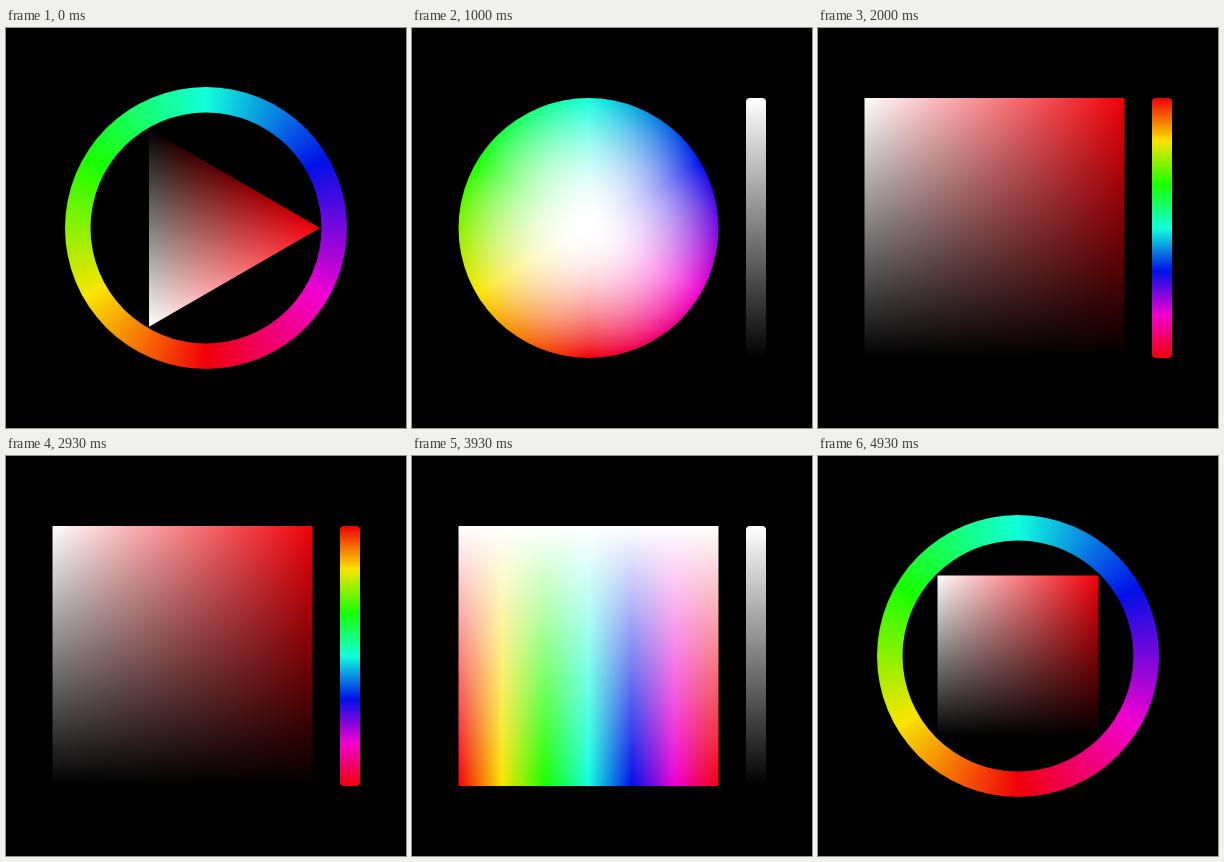
Animation, 400 px wide and 400 px high, one loop 4.99 s. Source, as an HTML page with a canvas:

```html
<!DOCTYPE html>
<html lang="en">
<head>
<meta charset="utf-8">
<title>Colour pickers</title>
<style>
  html, body { margin: 0; width: 100%; height: 100%; overflow: hidden; background: #000; }
  canvas { display: block; width: 100vw; height: 100vh; }
</style>
</head>
<body>
<canvas id="stage" width="400" height="400"></canvas>
<script>
const SIZE = 400, LOOP = 4990, SLIDE = 1000, TAU = Math.PI * 2;
const stage = document.getElementById('stage').getContext('2d');
const clamp = v => Math.min(1, Math.max(0, v));
const mix = (a, b, t) => a.map((v, i) => v + (b[i] - v) * t);

const BLACK = [0, 0, 0], WHITE = [255, 255, 255];
const RED = [240, 0, 8], YELLOW = [250, 228, 0], GREEN = [25, 255, 0];
const CYAN = [18, 255, 220], BLUE = [0, 15, 232], MAGENTA = [240, 0, 208];
const HUES = [RED, YELLOW, GREEN, CYAN, BLUE, MAGENTA];

function hsv(h, s, v) {
  const sector = Math.floor(h * 6);
  const hue = mix(HUES[sector % 6], HUES[(sector + 1) % 6], h * 6 - sector);
  return mix(BLACK, mix(WHITE, hue, s), v);
}

function newLayer() {
  const layer = document.createElement('canvas');
  layer.width = layer.height = SIZE;
  return layer.getContext('2d');
}

// Fills a path with a colour computed for each pixel.
function paint(target, path, colorAt) {
  const texture = newLayer(), image = texture.createImageData(SIZE, SIZE);
  for (let y = 0, i = 0; y < SIZE; y++) {
    for (let x = 0; x < SIZE; x++, i += 4) {
      image.data.set([...colorAt(x + 0.5, y + 0.5), 255], i);
    }
  }
  texture.putImageData(image, 0, 0);
  target.fillStyle = target.createPattern(texture.canvas, 'no-repeat');
  target.fill(path, 'evenodd');
}

// Red at the bottom, hue growing clockwise.
const hueAround = (dx, dy) => (Math.atan2(dy, dx) / TAU + 1.75) % 1;

function rectPath(x, y, w, h, radius = 0) {
  const path = new Path2D();
  path.roundRect(x, y, w, h, radius);
  return path;
}

function ring(c) {
  const path = new Path2D();
  path.arc(200, 200, 141, 0, TAU);
  path.closePath();
  path.moveTo(315.5, 200);
  path.arc(200, 200, 115.5, 0, TAU);
  paint(c, path, (x, y) => hsv(hueAround(x - 200, y - 200), 1, 1));
}

function triangle(c) {
  const radius = 114, left = 200 - radius / 2, half = radius * Math.sqrt(3) / 2;
  const path = new Path2D();
  path.moveTo(200 + radius, 200);
  path.lineTo(left, 200 + half);
  path.lineTo(left, 200 - half);
  path.closePath();
  paint(c, path, (x, y) => {
    const red = clamp((x - left) / (1.5 * radius));
    const white = clamp((1 - red) / 2 + (y - 200) / (2 * half));
    return RED.map((v, i) => red * v + white * WHITE[i]);
  });
}

function disc(c) {
  const cx = 176.5, cy = 200, radius = 130;
  const path = new Path2D();
  path.arc(cx, cy, radius, 0, TAU);
  paint(c, path, (x, y) => {
    const dx = x - cx, dy = y - cy;
    return hsv(hueAround(dx, dy), clamp(Math.hypot(dx, dy) / radius) ** 2, 1);
  });
}

// The callback receives horizontal and vertical positions from 0 to 1.
function square(c, left, top, side, colorAt) {
  paint(c, rectPath(left, top, side, side),
    (x, y) => colorAt(clamp((x - left) / side), clamp((y - top) / side)));
}

function bar(c, colorAt) {
  paint(c, rectPath(334, 70, 20, 260, 4), (x, y) => colorAt(clamp((y - 70) / 260)));
}

const shade = (u, v) => hsv(0, u, 1 - v);
const valueBar = c => bar(c, t => hsv(0, 0, 1 - t));
const hueBar = c => bar(c, t => hsv(t, 1, 1));

const slides = [
  [ring, triangle],
  [disc, valueBar],
  [c => square(c, 46.5, 70, 260, shade), hueBar],
  [c => square(c, 46.5, 70, 260, (u, v) => hsv(u, v, 1)), valueBar],
  [ring, c => square(c, 119.5, 119.5, 161, shade)]
].map(parts => {
  const layer = newLayer();
  layer.fillRect(0, 0, SIZE, SIZE);
  parts.forEach(draw => draw(layer));
  return layer.canvas;
});

function render(time) {
  const index = Math.floor((time % LOOP) / SLIDE);
  stage.drawImage(slides[index], 0, 0);
}

const start = performance.now();
function tick() {
  render(performance.now() - start);
  requestAnimationFrame(tick);
}
tick();
</script>
</body>
</html>
```
